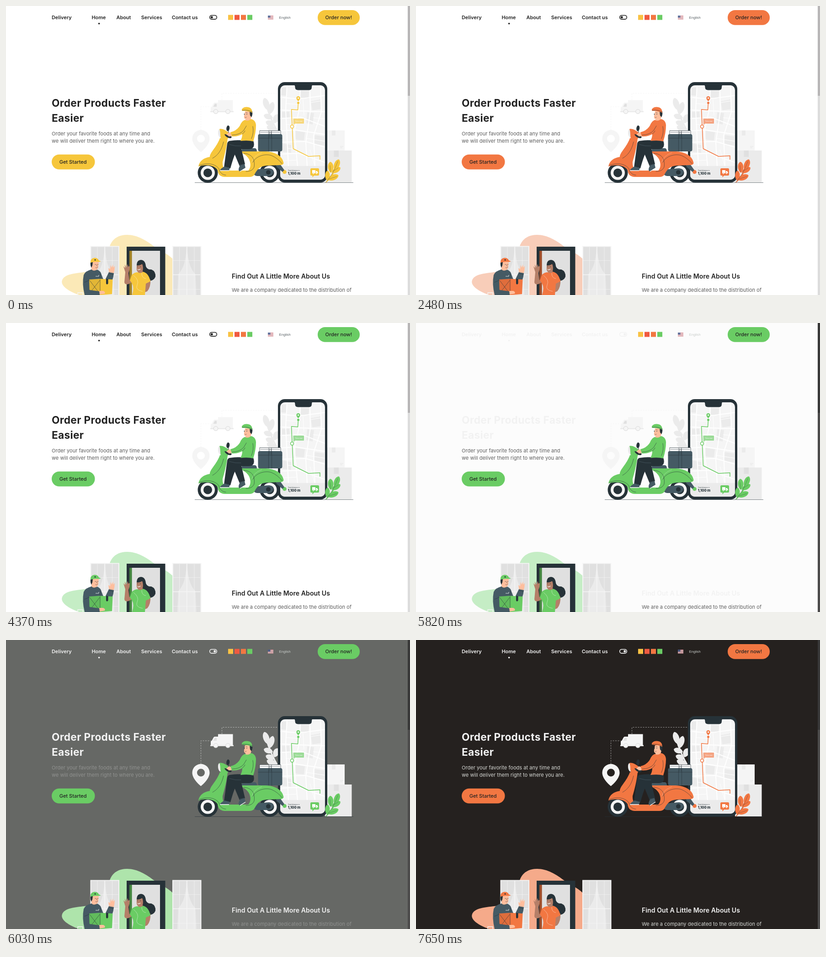
An HTML page that plays this animation: 884x634 px, repeating every 8 s.

```html
<!DOCTYPE html>
<html lang="en">
<head>
<meta charset="utf-8">
<title>Delivery</title>
<style>
@property --c { syntax: "<color>"; inherits: true; initial-value: #f6c63b; }
@property --blob { syntax: "<color>"; inherits: true; initial-value: #fbe9b7; }
@property --bg { syntax: "<color>"; inherits: true; initial-value: #fff; }
@property --soft { syntax: "<color>"; inherits: true; initial-value: #5c5c5c; }

html, body { margin: 0; width: 100%; height: 100%; overflow: hidden; }
html {
  animation: theme 8s infinite ease-in-out, blob 8s infinite cubic-bezier(.6,0,.8,.5),
    page 8s infinite ease, soft 8s infinite linear, mode 8s infinite step-end;
}
body { background: var(--bg); }
svg { display: block; width: 884px; height: 634px; }

@keyframes theme {
  0%, 6% { --c: #f6c63b; }
  13.6%, 22.5% { --c: #f05a40; }
  31%, 41.7% { --c: #f27742; }
  51.9%, 86.3% { --c: #6acc64; }
  95.6%, 100% { --c: #f27742; }
}
@keyframes blob {
  0%, 6% { --blob: #fbe9b7; }
  13.6%, 22.5% { --blob: #f8c0b5; }
  31%, 41.7% { --blob: #f8cdb9; }
  51.9% { --blob: #c5edc5; }
  72.6% { --blob: #c5edc5; animation-timing-function: ease; }
  79.1%, 86.3% { --blob: #a5e0a1; }
  95.6%, 100% { --blob: #f5aa8a; }
}
@keyframes page {
  0%, 72.6% { --bg: #fff; }
  79.5%, 86.3% { --bg: #20241f; animation-timing-function: ease-in-out; }
  95.6%, 100% { --bg: #25211f; }
}
@keyframes soft {
  0%, 72.6% { --soft: #5c5c5c; }
  79.1%, 100% { --soft: #d8dad6; }
}
@keyframes mode {
  0% { --ink: #222; --lang: #5c6468; --track: #dcdcdc; --thumb: #b8b6b7; --knob: 0px; }
  72.6%, 100% { --ink: #f2f2f2; --lang: #c9cdca; --track: #4c4b4b; --thumb: #383838; --knob: 6.6px; }
}

text { font-family: Inter, "Open Sans", sans-serif; font-size: 11px; }
.c { fill: var(--c); }
.ink { fill: var(--ink); }
.soft { fill: var(--soft); letter-spacing: .05px; }
.nav { font-weight: 600; font-size: 10.9px; }
.btn { font-weight: 500; fill: #222; }
.h1 { font-size: 22.6px; font-weight: 700; letter-spacing: .35px; }
.h2 { font-size: 14.1px; font-weight: 600; letter-spacing: .05px; }
.lang { font: 7.7px "Liberation Sans", Arial, sans-serif; fill: var(--lang); }
.d { fill: #263238; }
.s { fill: #455a64; }
.g1 { fill: #f5f5f5; }
.g2 { fill: #ebebeb; }
.g3 { fill: #e0e0e0; }
.skin { fill: #ffbe9d; }
.brown { fill: #b57f68; }
.w { fill: #fff; }
.line { fill: none; stroke: #263238; stroke-width: .6; stroke-linecap: round; }
.route { fill: none; stroke: var(--c); stroke-width: 1.5; stroke-linejoin: round; }
.knob { transform: translateX(var(--knob)); }
</style>
</head>
<body>
<svg viewBox="0 0 884 634">
  <defs>
    <path id="leaf" d="M0 0C-8-5-8-19 0-22C8-19 8-5 0 0Z"/>
    <g id="wheel">
      <circle r="22" class="d"/><circle r="15.5" class="g1"/><circle r="9.5" class="d"/>
    </g>
    <g id="window">
      <path class="g1" d="M0 0H63.5V108H0Z"/>
      <path class="g2" d="M2 2H61.5V108H2Z"/>
      <path class="g3" d="M2 2H31C30 30 25 49 13 62L11 108H2ZM61.5 2H32.5C33.5 30 38.5 49 50.5 62L52.5 108H61.5Z"/>
      <path d="M15.5 2V108M48 2V108M2 32H61M2 95H61" stroke="#f5f5f5" stroke-width=".7" fill="none"/>
      <path d="M31.7 2V108M2 63H61" stroke="#f5f5f5" stroke-width="1.6"/>
    </g>
    <clipPath id="screen"><rect x="600" y="174" width="98" height="207" rx="10"/></clipPath>
  </defs>

  <!-- header -->
  <g class="ink">
    <text class="nav" x="100" y="29.3">Delivery</text>
    <text class="nav" x="187.5" y="28.7">Home</text>
    <text class="nav" x="241.5" y="28.7">About</text>
    <text class="nav" x="295.7" y="28.7">Services</text>
    <text class="nav" x="362.7" y="28.7">Contact us</text>
    <circle cx="203.6" cy="38.6" r="1.8"/>
    <rect x="445.7" y="20.5" width="15.6" height="8.6" rx="4.3" fill="none" stroke="var(--ink)" stroke-width="1.6"/>
    <circle class="knob" cx="450.2" cy="24.8" r="2.5"/>
  </g>
  <path d="M486 19.5h11v11h-11z" fill="#f9c244"/>
  <path d="M500 19.5h11v11h-11z" fill="#f05a40"/>
  <path d="M514 19.5h11v11h-11z" fill="#f27742"/>
  <path d="M528 19.5h11v11h-11z" fill="#6acc64"/>
  <g opacity=".85">
    <path d="M573 21h12v8.5h-12z" fill="#eee"/>
    <path d="M573 21.5h12M573 23.4h12M573 25.3h12M573 27.2h12M573 29.1h12" stroke="#cf6670" stroke-width=".9"/>
    <path d="M573 21h5.5v4.5h-5.5z" fill="#4a5b8c"/>
  </g>
  <text class="lang" x="597.5" y="27.7">English</text>
  <rect class="c" x="682" y="9" width="92" height="32.7" rx="16.3"/>
  <text class="btn" x="698.6" y="29.3">Order now!</text>

  <!-- hero copy -->
  <text class="h1 ink" x="100" y="221">Order Products Faster</text>
  <text class="h1 ink" x="100" y="254.3">Easier</text>
  <text class="soft" x="100" y="283.6">Order your favorite foods at any time and</text>
  <text class="soft" x="100" y="299.6">we will deliver them right to where you are.</text>
  <rect class="c" x="100" y="325.7" width="94.5" height="32.7" rx="16.3"/>
  <text class="btn" x="116.7" y="346">Get Started</text>

  <!-- hero backdrop -->
  <path d="M426.5 272V221H448M472.5 206V191.5H595" fill="none" stroke="#f0f0f0" stroke-width=".6" stroke-dasharray="3 2.5"/>
  <path class="g1" fill-rule="evenodd" d="M426.5 320.5C422 317 407.5 304 407.5 291A19 19 0 0 1 445.5 291C445.5 304 431 317 426.5 320.5ZM418 291a8.5 8.5 0 1 0 17 0a8.5 8.5 0 1 0-17 0Z"/>
  <g class="g1">
    <path d="M464 206.5H496.500V231H448V224Q448 221 450.5 220.5L454 214Q455 212 457 212H464Z"/>
    <path class="g3" d="M461 214.5H457L453.5 221H461Z"/>
    <path class="g2" d="M447 230.5H498V233H447Z"/>
    <g stroke="#dedede" stroke-width="1.2"><circle cx="459" cy="231.5" r="4.7"/><circle cx="485.5" cy="231.5" r="4.7"/></g>
  </g>
  <g class="g2">
    <use href="#leaf" transform="translate(574 229)rotate(-18)scale(1.1 1.3)"/>
    <use href="#leaf" transform="translate(577 237)rotate(15)scale(1.05 1.25)"/>
    <use href="#leaf" transform="translate(584 246)rotate(-72)scale(1 .95)"/>
    <use href="#leaf" transform="translate(587 257)rotate(22)scale(1.1 .95)"/>
    <use href="#leaf" transform="translate(588 261)rotate(-70)scale(1 .95)"/>
    <use href="#leaf" transform="translate(592 273)rotate(-68)scale(1.05)"/>
    <path d="M566 205Q577 246 593 273" fill="none" stroke="#ebebeb" stroke-width="3.5"/>
  </g>
  <path class="g1" d="M698 273H741V317H698Z"/>
  <path d="M731 308h7M731 311h5" stroke="#e4e4e4"/>
  <path class="g2" d="M713 273h8v11h-8zM698 317H756.500V387H698Z"/>
  <path class="g3" d="M717.5 317h10.5v14h-10.5z"/>
  <path d="M413 387.5H760" stroke="#263238" stroke-width=".6"/>

  <!-- phone -->
  <rect class="d" x="595" y="167" width="108" height="220.5" rx="15"/>
  <g clip-path="url(#screen)">
    <path class="g1" d="M600 174H698V381H600Z"/>
    <path class="g2" d="M603 179h11l-1 18-11-1zM667 209l21-4 2 21-20 3zM659 233l15 2-3 25-14-3zM604 232h16l1 13h-17zM634 274l20 3-2 18-19-2zM604 301l20 4v17l-20-2zM676 283l20 3v20l-22-3zM645 186l18 1-1 16-17-2z"/>
    <g fill="none" stroke="#fff" stroke-width="2">
      <path d="M598 200L641 204L700 196M598 228L640 230L700 232M598 247L645 244L700 265M598 274L634 272L700 282M598 299L655 297L700 310M598 325L640 323L700 344M615 172L612 228L618 352M644 184L641 230L631 275L638 352M665 180L666 230L656 300L659 352M688 172L690 232L673 285L676 352"/>
      <path d="M612 214L641 216M666 212L690 208M672 245L700 248M612 260L634 260M655 290L700 297M616 312L634 314M600 340L637 338M665 315L676 352M650 205L652 240" stroke-width="1"/>
    </g>
    <path class="g2" d="M600 351H698V381H600Z"/>
  </g>
  <path class="d" d="M630 173H671Q669 174 669 178Q669 184.5 663 184.5H639Q632.5 184.5 632.5 178Q632.5 174 630 173Z"/>
  <path class="route" d="M639.5 213L638.5 228L624.5 227L628.5 313L662 330L687 328.5V337"/>
  <circle class="c" cx="639.5" cy="212.5" r="2.5"/>
  <path class="c" fill-rule="evenodd" d="M639.5 209C637 206 635.5 205 635.5 202a4 4 0 0 1 8 0C643.5 205 642 206 639.5 209ZM637.8 202a1.7 1.7 0 1 0 3.4 0a1.7 1.7 0 1 0-3.4 0Z"/>
  <circle cx="626" cy="264.5" r="3.4" fill="#fff" stroke="var(--c)" stroke-width="1.5"/>
  <path class="c" opacity=".65" d="M629.5 247H651Q652 247 652 248V257Q652 258 651 258H632L629 261.5L628.5 248Q628.5 247 629.5 247Z"/>
  <text class="w" x="632.5" y="254" style="font-size:3.5px">Time now</text>
  <circle class="c" cx="609.5" cy="364" r="4.3"/>
  <text class="d" x="617" y="361.5" style="font-size:3.3px">Total distance is</text>
  <text class="d" x="616.7" y="369.6" style="font-size:7.5px;font-weight:800">1,100 m</text>
  <path class="c" d="M668.5 356H682.5Q685 356 685 358.5V369.5Q685 372 682.5 372H674L670.5 376V372H668.5Q666 372 666 369.5V358.5Q666 356 668.5 356Z"/>
  <path class="w" d="M670 360h7v7h-7zM678 362h2.5l2 2.5v2.5h-4.5z"/>
  <g class="w" stroke="var(--c)" stroke-width=".6"><circle cx="672.5" cy="367.5" r="1.5"/><circle cx="679.5" cy="367.5" r="1.5"/></g>

  <g class="c">
    <use href="#leaf" transform="translate(719 360)rotate(22)scale(1 1.15)"/>
    <use href="#leaf" transform="translate(711 366)rotate(-3)scale(1 1.1)"/>
    <use href="#leaf" transform="translate(713 366)rotate(58)scale(.9 1)"/>
    <use href="#leaf" transform="translate(704 381)rotate(68)scale(1 1.15)"/>
    <use href="#leaf" transform="translate(703 383)rotate(2)scale(.85 1)"/>
    <path d="M699 387Q714 372 726 341L728 343Q717 374 701 387Z"/>
  </g>
  <path class="line" opacity=".6" d="M700 386Q716 370 726 341M710 364L709 350M715 363L727 355M705 380L724 374"/>

  <!-- scooter -->
  <use href="#wheel" x="441.5" y="366"/>
  <use href="#wheel" x="577" y="366"/>
  <path class="s" d="M590 345L599 346L609 360L605 364L592 353Z"/>
  <path class="s" d="M541 364Q543 358 552 358L575 356Q585 357 585 364Q584 373 573 373H549Q541 372 541 364Z"/>
  <circle class="d" cx="574" cy="365" r="5"/>
  <path class="s" d="M515 319Q514 312 523 312H545Q549 313 549 319Z"/>
  <path class="w" d="M555 273.5H601V282H555Z" stroke="#263238" stroke-width=".7"/>
  <path class="line" d="M557 277H599M575 274V281M581 274V281"/>
  <rect class="s" x="551.5" y="281" width="53" height="38" rx="4"/>
  <path class="line" d="M552 290H604M574.5 281V319M581.5 281V319M577 276L576 288M580 276V288"/>
  <path class="c" d="M421 352C423 340 433 333 446 331C446 321 461 310 468 290L485 290C483 309 478 329 474 342Q473 359 486 361H530C538 354 537 333 519 324Q515 321 516 319H568C592 320 606 331 607.5 345Q606 349 600 349L572 350C557 351 551 356 544 369Q541 375 532 375H478C467 374 464 368 463 360C456 348 434 347 421 352Z"/>
  <path class="line" d="M423 350C436 344 456 344 466 357C468 365 472 370 481 371M476 298C472 317 463 328 452 334M520 323C540 325 545 337 543 353C540 361 533 363 525 363M540 343C546 330 566 323 581 328Q595 334 604 346"/>
  <path d="M538 343Q541 328 560 322" fill="none" stroke="#fff" opacity=".45" stroke-width=".7"/>
  <ellipse class="g2" cx="468.5" cy="279.5" rx="4.5" ry="9.5" transform="rotate(-8 468.5 279.5)"/>
  <path class="c" d="M467 270C474 268 482 274 489 279L485 292H471C468 288 470 276 467 270Z"/>
  <path d="M488 285Q486 276 487 270" fill="none" stroke="#263238" stroke-width="1"/>
  <ellipse class="d" cx="485.8" cy="268.3" rx="3.5" ry="6.2" transform="rotate(8 486 268)"/>

  <!-- rider -->
  <path class="d" d="M494 310L511 351L523 347L514 309Z"/>
  <path class="d" d="M489 296Q513 293 541 295Q547 313 532 314H507Q500 323 491 356L477 354L484 302Q485 297 489 296Z"/>
  <path class="line" style="stroke:#536570" d="M489 304Q502 308 514 307M512 349L521 347"/>
  <path class="s" d="M478 352L490 355L488 361H468Q469 357 478 352ZM512 350L522 347L524 355L512 363Q506 361 512 350Z"/>
  <path d="M468 361H488M512 363L524 355.5" stroke="#fff" stroke-width="1.3"/>
  <path class="skin" d="M523 231H538L537 243L535 250Q531 256 524 252L524 248Q520 247 521 241Z"/>
  <path class="d" d="M533 231H539Q540 239 537 244L534 240Z"/>
  <path class="c" d="M516 229Q515 225 522 222Q534 220 538 228L539 234Q529 230 517 230Z"/>
  <path class="line" d="M517 229Q528 227 538 232M525 234L528 234.5M520.5 237L522 239M526 244Q524 246 523 244"/>
  <circle class="d" cx="527" cy="237.5" r=".8"/><circle class="d" cx="522" cy="237" r=".8"/>
  <path class="skin" d="M482 282L488 277L495 280L493 287L486 288Z"/>
  <path class="d" d="M478 282Q480 280 485 284L493 286Q495 289 491 290Q483 290 478 282Z"/>
  <path class="skin" d="M485 281L491 280L492 286L487 286Z"/>
  <path class="c" d="M523 250Q529 254 536 248Q546 250 547 261Q547 278 541 297Q530 294 513 296Q517 289 517 281Q507 287 494 286L491 277Q505 274 512 262Q516 252 523 250Z"/>
  <path class="line" d="M495 283Q511 283 520 273L526 263M517 281Q521 278 523 274M540 264Q543 277 537 291"/>

  <!-- doorway -->
  <path fill="var(--blob)" d="M160 634C134 625 120 613 122.5 603C126 588 151 586 181 583C207 580 222 554 227 527C233 509 248 502 265 502C286 502 305 513 322 526C338 537 354 544 364 554V634Z"/>
  <use href="#window" x="184.5" y="526.5"/>
  <use href="#window" x="364" y="526.5"/>
  <path class="d" d="M264 528H348.5V634H264Z"/>
  <path class="g3" d="M270 537H337V634H270Z"/>
  <path class="c" d="M270 537H275.5V634H270Z"/>
  <path d="M270 537H275.5V634H270Z" opacity=".35"/>
  <path d="M157 634V629H168V634" fill="none" stroke="#f5f5f5" stroke-width="1.3"/>

  <!-- courier -->
  <path class="skin" d="M226 588L224 575L228 577L229 568L231.5 574L234 567L235 574L238 570Q238 580 235 589Z"/>
  <path class="s" d="M187 578Q200 575 207 584L215 605L225 584L236 586Q234 606 224 617H210L205 634H172Q166 609 170 590Q174 581 187 578Z"/>
  <path class="skin" d="M187 560H203L202 573Q200 580 195 580Q190 582 187 577Z"/>
  <path class="d" d="M185 562H190L189 569L187 574Q184 569 185 562Z"/>
  <path class="c" d="M185 563Q184 554 193 552.5Q201 552 203 558L207.5 560Q205 562 200 561Q192 561 185 563Z"/>
  <circle class="d" cx="195" cy="557" r="1.5"/>
  <circle class="d" cx="195.5" cy="567" r=".7"/><circle class="d" cx="201" cy="567" r=".7"/>
  <path class="line" d="M196 574Q199 576 201 573M198 567L199.5 571M172 606Q179 604 182 601M226 587L235 589M207 587Q204 595 208 605"/>
  <path d="M196 593H203V590" fill="none" stroke="#fff" stroke-width=".8"/>
  <path class="c" d="M182 600L206 598.5L233.5 600L232 632L207 634H183Z"/>
  <path d="M182 600L206 599V634H183Z" opacity=".08"/>
  <path class="line" d="M183 602L205 631M205 602L184 629M206 600V632"/>
  <path class="d" d="M219 599H223.5V609L221 611L219 609Z"/>
  <path class="s" d="M169 613Q176 612 183 623L205 626V634H178Z"/>
  <path class="skin" d="M204 625L213 625Q218 627 216 631L205 633Z"/>

  <!-- customer -->
  <path class="d" d="M286 572Q285 557 296 557Q305 558 306 571Q309 579 318 578Q328 582 327 594Q323 605 306 603Q295 599 293 588Z"/>
  <path class="brown" d="M259 606L261 584L257 571L261 575L260 567L264 574L266 566L268 572L271 570Q271 578 268 586L270 602L281 591L284 602L268 610Q260 612 259 606Z"/>
  <path class="brown" d="M286 569Q291 570 298 566Q301 573 299 582L301 590H288L289 583Q285 583 286 569Z"/>
  <path class="brown" d="M305 602L316 600Q317 617 309 626L287 634H281L302 617Z"/>
  <path class="c" d="M275 590Q281 584 288 584Q294 588 300 583Q312 586 316 604L306 609L304 634H276Q281 618 276 609L271 602Z"/>
  <path d="M279 591Q292 601 287 612T299 626M297 586Q297 597 306 598" fill="none" stroke="#fff" opacity=".55" stroke-width=".8"/>
  <circle class="d" cx="288" cy="572" r=".7"/><circle class="d" cx="294" cy="572" r=".7"/>
  <path d="M288 578Q291 580 294 577" fill="none" stroke="#fff" stroke-width="1.1"/>

  <!-- about copy -->
  <text class="h2 ink" x="494" y="597.7">Find Out A Little More About Us</text>
  <text class="soft" x="494" y="626.5">We are a company dedicated to the distribution of</text>

  <path d="M879 0h5v634h-5z" fill="var(--track)"/>
  <path d="M879 0h5v197h-5z" fill="var(--thumb)"/>
</svg>
</body>
</html>
```
